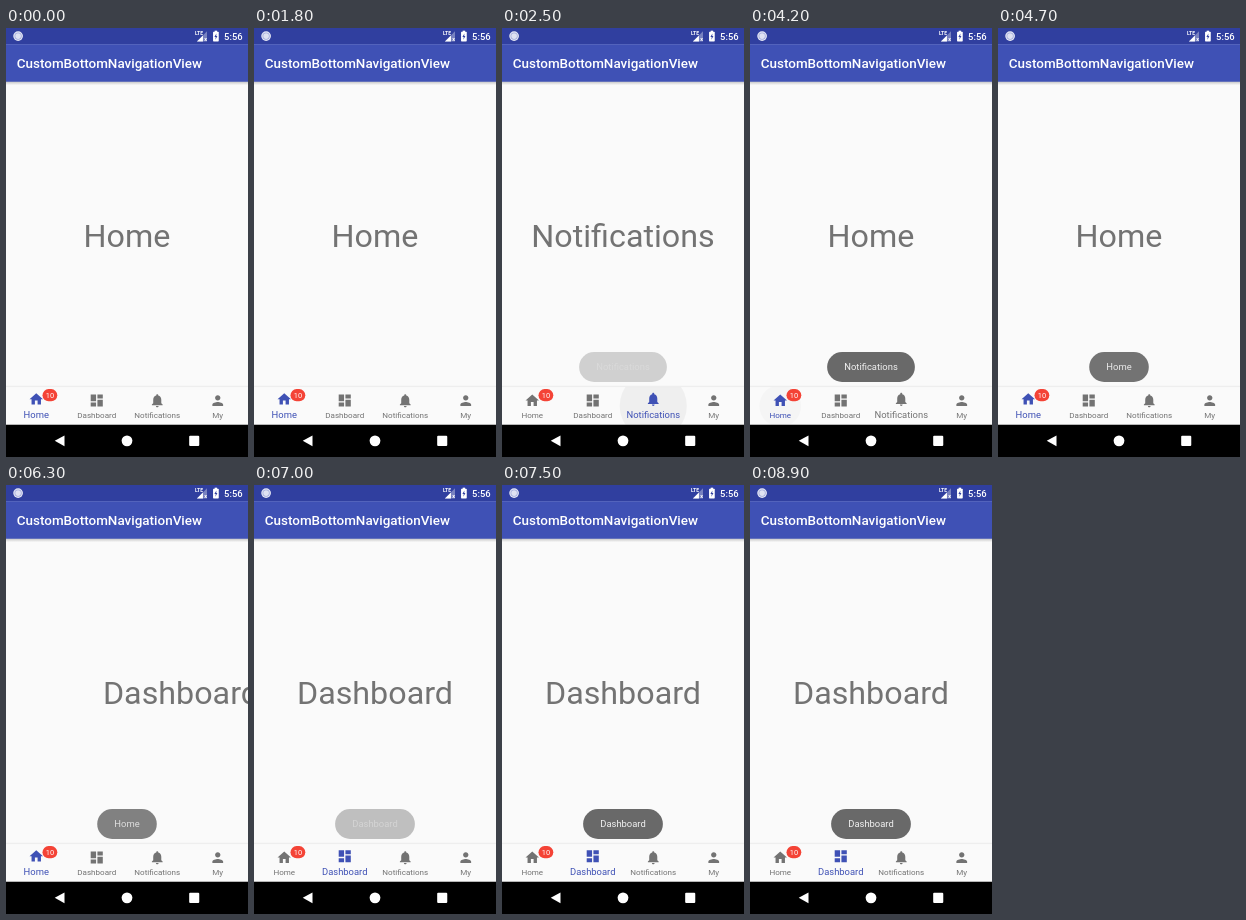
An HTML page with a canvas for the animation above (9000 ms loop, 242x429 px).

```html
<!DOCTYPE html>
<html lang="en">
<head>
<meta charset="utf-8">
<title>Bottom navigation</title>
<style>
  html, body { margin: 0; width: 100%; height: 100%; overflow: hidden; background: #fafafa; }
  canvas { display: block; width: 242px; height: 429px; }
</style>
</head>
<body>
<canvas id="stage"></canvas>
<script>
const W = 242, H = 429, LOOP = 9000, STEP = 100;
const dpr = window.devicePixelRatio || 1;
const canvas = document.getElementById('stage');
const ctx = canvas.getContext('2d');
canvas.width = W * dpr;
canvas.height = H * dpr;

// Layout is in dp on a 360 dp wide screen.
const DP = W / 360, BOTTOM = H / DP;
const BAR_TOP = BOTTOM - 104, KEYS_TOP = BOTTOM - 48;
const BLUE = '#3f51b5', GREY = '#737373';

const items = [
  { label: 'Home', icon: 'M10 20v-6h4v6h5v-8h3L12 3 2 12h3v8z' },
  { label: 'Dashboard', icon: 'M3 13h8V3H3v10zm0 8h8v-6H3v6zm10 0h8V11h-8v10zm0-18v6h8V3h-8z' },
  { label: 'Notifications', icon: 'M12 22c1.1 0 2-.9 2-2h-4c0 1.1.89 2 2 2zm6-6v-5c0-3.07-1.64-5.64-4.5-6.32V4c0-.83-.67-1.5-1.5-1.5s-1.5.67-1.5 1.5v.68C7.63 5.36 6 7.92 6 11v5l-2 2v1h16v-1z' },
  { label: 'My', icon: 'M12 12c2.21 0 4-1.79 4-4s-1.79-4-4-4-4 1.79-4 4 1.79 4 4 4zm0 2c-2.67 0-8 1.34-8 4v2h16v-2c0-2.66-5.33-4-8-4z' }
].map(item => ({ label: item.label, icon: new Path2D(item.icon) }));

const selections = [
  { at: -1000, item: 0 },
  { at: 2200, item: 2 },
  { at: 4200, item: 0 },
  { at: 6400, item: 1 }
];
const ripples = [{ at: 2150, item: 2 }, { at: 4120, item: 0 }];
const toasts = [
  { label: 'Notifications', show: 2420, hide: 4190 },
  { label: 'Home', show: 4330, hide: 6095 },
  { label: 'Dashboard', show: 6885, hide: LOOP }
];

const ramp = (t, from, to) => Math.min(1, Math.max(0, (t - from) / (to - from)));
const mix = (a, b, p) => a + (b - a) * p;
const smooth = p => p * p * (3 - 2 * p);
const easeOut = p => 1 - (1 - p) ** 2;
const centerOf = i => 45 + i * 90;

function rect(x, y, w, h, color) {
  ctx.fillStyle = color;
  ctx.fillRect(x, y, w, h);
}

function pill(x, y, w, h, r, color) {
  ctx.fillStyle = color;
  ctx.beginPath();
  ctx.roundRect(x, y, w, h, r);
  ctx.fill();
}

function disc(x, y, r, color) {
  ctx.fillStyle = color;
  ctx.beginPath();
  ctx.arc(x, y, r, 0, Math.PI * 2);
  ctx.fill();
}

function shape(points, color) {
  ctx.fillStyle = color;
  ctx.beginPath();
  points.forEach(([x, y]) => ctx.lineTo(x, y));
  ctx.closePath();
  ctx.fill();
}

function setFont(size, weight = 400) {
  ctx.font = `${weight} ${size}px Roboto, sans-serif`;
}

function text(str, x, y, size, color, align = 'center', weight = 400) {
  setFont(size, weight);
  ctx.textAlign = align;
  ctx.fillStyle = color;
  ctx.fillText(str, x, y);
}

function shade(y, h, top, bottom) {
  const g = ctx.createLinearGradient(0, y, 0, y + h);
  g.addColorStop(0, `rgba(0,0,0,${top})`);
  g.addColorStop(1, `rgba(0,0,0,${bottom})`);
  rect(0, y, 360, h, g);
}

function pagePosition(t) {
  if (t < 2200) return 0;
  if (t < 4200) return 2;
  // Finger drag, then a short settle after release.
  const drag = 0.777 * smooth(ramp(t, 5600, 6300));
  return mix(drag, 1, easeOut(ramp(t, 6300, 6550)));
}

function drawPages(t) {
  const pos = pagePosition(t);
  for (let i = 0; i < 3; i++) {
    text(items[i].label, 180 + (i - pos) * 360, 326, 48, GREY);
  }
}

function drawHeader() {
  rect(0, 0, 360, 24, '#303f9f');
  rect(0, 24, 360, 56, BLUE);
  shade(80, 5, 0.2, 0);
  text('CustomBottomNavigationView', 16, 59, 20, '#fff', 'left', 500);

  disc(18, 12, 7.2, '#e8eaf6');
  disc(18, 12, 5.4, '#9fa8da');
  disc(18, 12, 4.2, '#dfe2f2');

  text('LTE', 281, 11, 7.5, '#fff', 'left', 700);
  shape([[284, 20], [299, 5], [299, 20]], 'rgba(255,255,255,.35)');
  shape([[284, 20], [293, 11], [293, 20]], '#fff');
  text('x', 297, 20, 8, '#fff', 'center', 700);

  pill(308, 5.5, 8.5, 14.5, 1, '#fff');
  rect(310.4, 4, 3.7, 2, '#fff');
  shape([[313, 8], [310, 13.5], [312, 13.5], [311.5, 17.5], [314.5, 12], [312.7, 12]], '#303f9f');
  text('5:56', 352, 17.2, 14, '#fff', 'right', 500);
}

function drawRipples(t) {
  ctx.save();
  ctx.beginPath();
  ctx.rect(0, BAR_TOP, 360, 56);
  ctx.clip();
  for (const { at, item } of ripples) {
    const alpha = 0.045 * ramp(t, at, at + 200) * (1 - ramp(t, at + 350, at + 560));
    if (alpha > 0) {
      const r = mix(15, 50, easeOut(ramp(t, at, at + 300)));
      disc(centerOf(item), BAR_TOP + 28, r, `rgba(0,0,0,${alpha})`);
    }
  }
  ctx.restore();
}

function drawBar(t) {
  shade(BAR_TOP - 3, 3, 0, 0.07);
  rect(0, BAR_TOP, 360, 56, '#fafafa');
  drawRipples(t);

  const now = selections.findLastIndex(s => t >= s.at);
  const active = selections[now].item;
  const previous = now > 0 ? selections[now - 1].item : -1;
  const p = smooth(ramp(t, selections[now].at, selections[now].at + 100));

  items.forEach(({ label, icon }, i) => {
    const grow = i === active ? p : i === previous ? 1 - p : 0;
    const color = i === active ? BLUE : GREY;
    ctx.save();
    ctx.translate(centerOf(i) - 12, BAR_TOP + mix(8, 6, grow));
    ctx.fillStyle = color;
    ctx.fill(icon);
    ctx.restore();
    text(label, centerOf(i), BAR_TOP + 46, mix(12, 14, grow), color);
  });

  pill(54.3, BAR_TOP + 3, 22, 18, 9, '#f44336');
  text('10', 65.3, BAR_TOP + 16, 11, '#fff');
}

function drawToasts(t) {
  for (const { label, show, hide } of toasts) {
    const alpha = easeOut(ramp(t, show, show + 500)) * (1 - ramp(t, hide, hide + 500) ** 2);
    if (alpha <= 0) continue;
    ctx.globalAlpha = alpha;
    setFont(14);
    const w = ctx.measureText(label).width + 51;
    pill(180 - w / 2, 482, w, 44.5, 22.25, '#696969');
    text(label, 180, 509.5, 14, '#f2f2f2');
  }
  ctx.globalAlpha = 1;
}

function drawKeys() {
  rect(0, KEYS_TOP, 360, 48, '#000');
  const y = KEYS_TOP + 24;
  shape([[72.5, y], [87, y - 8], [87, y + 8]], '#fff');
  disc(180, y, 8, '#fff');
  pill(272.5, y - 7.5, 15, 15, 1.5, '#fff');
}

function draw(t) {
  ctx.setTransform(DP * dpr, 0, 0, DP * dpr, 0, 0);
  rect(0, 0, 360, BOTTOM, '#fafafa');
  drawPages(t);
  drawHeader();
  drawBar(t);
  drawToasts(t);
  drawKeys();
}

const start = performance.now();
function tick() {
  const t = (performance.now() - start) % LOOP;
  draw(Math.floor(t / STEP) * STEP);
  requestAnimationFrame(tick);
}
tick();
</script>
</body>
</html>
```
